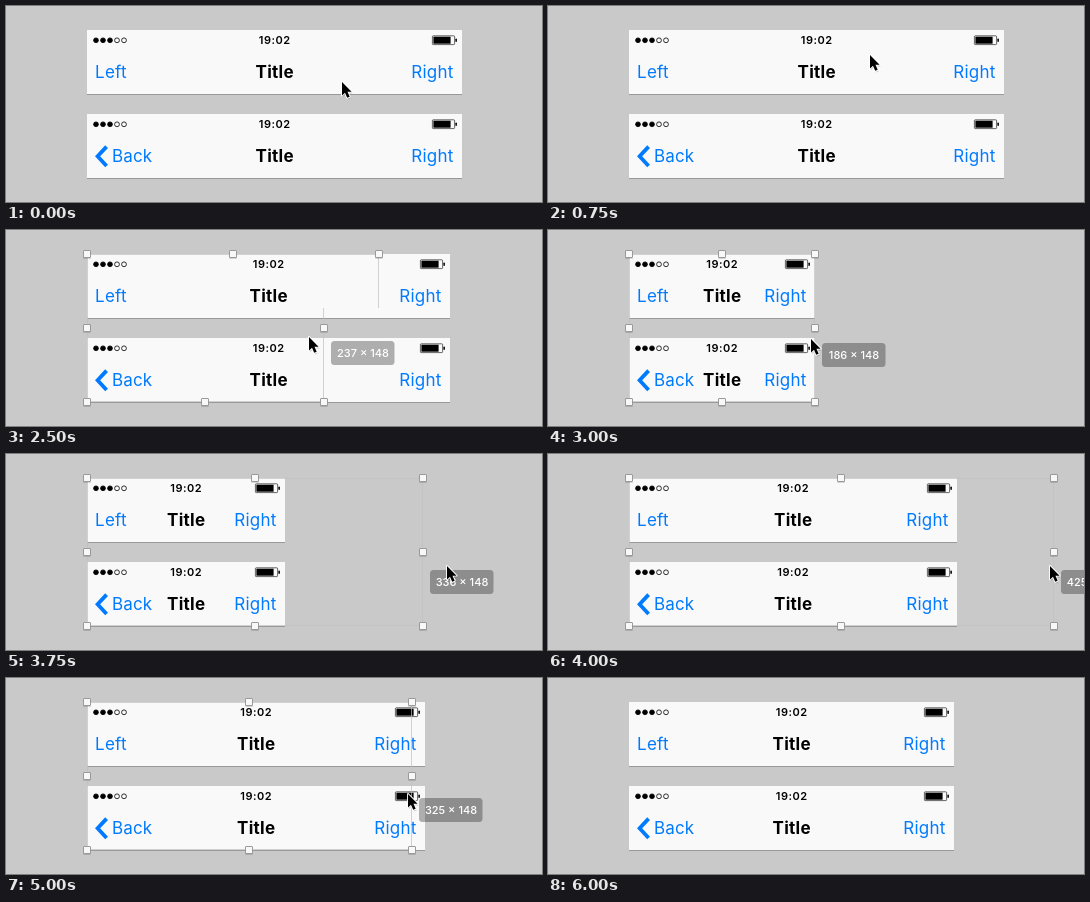
Recreate the animation shown at these times as an HTML page. Size 536x196 px, loop 7000 ms.

```html
<!DOCTYPE html>
<html lang="en">
<head>
<meta charset="utf-8">
<title>Resizing navigation bars</title>
<style>
  html, body { margin: 0; width: 100%; height: 100%; overflow: hidden; background: #c9c9c9; }
  svg { display: block; font-family: Inter, "Liberation Sans", sans-serif; }
  .clock { font-size: 11px; font-weight: 600; letter-spacing: .5px; text-anchor: middle; }
  .title { font-size: 17px; font-weight: 700; letter-spacing: .25px; text-anchor: middle; }
  .link { font-size: 17px; fill: #007aff; letter-spacing: .2px; }
  .end { text-anchor: end; }
  .size { font-size: 11px; font-weight: 500; fill: #fff; text-anchor: middle; }
  .edge { fill: none; stroke: #c0c0c0; stroke-opacity: .7; }
</style>
</head>
<body>
<svg width="536" height="196" viewBox="0 0 536 196">
  <defs>
    <g id="battery">
      <rect x="-29.6" y="5.8" width="22.2" height="8.8" rx=".8" fill="none" stroke="#000" stroke-width=".8" stroke-opacity=".75"/>
      <rect x="-28.6" y="6.7" width="17.2" height="7"/>
      <rect x="-6.6" y="8.6" width="1.5" height="3.4" rx=".7"/>
    </g>
    <g id="handle">
      <rect x="-4" y="-3" width="8" height="8" rx="1" fill-opacity=".14"/>
      <rect x="-3.5" y="-3.5" width="7" height="7" rx=".5" fill="#f8f8f8" stroke="#999"/>
    </g>
  </defs>
  <g id="bars"></g>
  <g id="selection">
    <path class="edge" id="outline"/>
    <g id="handles"></g>
  </g>
  <g id="label">
    <rect width="63.5" height="24" rx="3.5" fill-opacity=".3"/>
    <text class="size" x="32" y="16"></text>
  </g>
  <g id="cursor">
    <path d="M1 1.5V15l3-2.6 2.2 5 2.6-1.1-2.2-4.8h4.2z" fill-opacity=".18"/>
    <path d="M0 0V13.4L3 10.7 5.2 15.8 7.7 14.8 5.5 9.7H9.6Z" stroke="#fff" stroke-width="1.8" paint-order="stroke" stroke-linejoin="round"/>
  </g>
</svg>
<script>
  const LOOP = 7000, TICK = 250;
  const LEFT = 81, TOP = 24, MID = 98, BOTTOM = 172, TEAR = 78, FULL = 375;
  const $ = id => document.getElementById(id);

  // Each move is [start, end, ...values reached].
  const pull = [3500, 3926, 425], settle = [4500, 4879, 325];
  const lowerBox = [[2250, 2629, 186], pull, settle];
  const upperBox = [[2000, 2250, 324], [2388, 2748, 186], pull, settle];
  const barMoves = [[2437, 2854, 186], [3673, 4253, 425], [4500, 5149, 325]];
  const pointer = [
    [0, 250, 291, 94], [250, 500, 311, 153], [500, 750, 322, 49],
    [1000, 1500, 432, 103], [1500, 1750, 455, 107], [1750, 2000, 450, 101],
    [2014, 2708, 263, 109], [3500, 3873, 502, 112.4], [4500, 4879, 402, 116]
  ];

  const ease = u => u * u * (3 - 2 * u);

  function follow(moves, from, t) {
    let at = from;
    for (const [start, end, ...to] of moves) {
      const k = ease(Math.min(1, Math.max(0, (t - start) / (end - start))));
      at = at.map((v, i) => v + (to[i] - v) * k);
    }
    return at.map(Math.round);
  }

  const place = (el, x, y) => el.setAttribute("transform", `translate(${x} ${y})`);
  const show = (el, on) => { el.style.display = on ? "" : "none"; };

  function dots() {
    return [0, 1, 2, 3, 4].map(i =>
      `<circle cx="${9 + 7 * i}" cy="10.3" r="2.4" stroke="#000" stroke-width=".8" fill-opacity="${i < 3 ? 1 : 0}"/>`).join("");
  }

  function makeBar(y, back) {
    const g = document.createElementNS("http://www.w3.org/2000/svg", "g");
    place(g, LEFT, y);
    const left = back
      ? `<path d="M19.6 32.6 10.6 42.3 19.6 52" fill="none" stroke="#007aff" stroke-width="3.8"/>
         <text class="link" x="24.9" y="48">Back</text>`
      : `<text class="link" x="8.1" y="48">Left</text>`;
    g.innerHTML = `<rect class="wide" height="64" fill="#f9f9f9"/>
      <rect class="wide" y="64" height="1" fill="#999"/>
      ${dots()}${left}
      <text class="clock mid" y="14">19:02</text>
      <text class="title mid" y="48">Title</text>
      <use class="right" href="#battery"/>
      <g class="right"><text class="link end" x="-8.6" y="48">Right</text></g>`;
    $("bars").append(g);
  }

  function setWidth(w) {
    const each = (sel, fn) => $("bars").querySelectorAll(sel).forEach(fn);
    each(".wide", el => el.setAttribute("width", w));
    each(".mid", el => el.setAttribute("x", w / 2 + .2));
    each(".right", el => place(el, w, 0));
  }

  function setSelection(low, high) {
    const right = LEFT + low, upper = LEFT + high;
    const half = w => LEFT + Math.floor(w / 2);
    const points = [
      [LEFT, TOP], [half(high), TOP], [upper, TOP],
      [LEFT, MID], [right, MID],
      [LEFT, BOTTOM], [half(low), BOTTOM], [right, BOTTOM]
    ];
    $("handles").innerHTML = points.map(([x, y]) =>
      `<use href="#handle" x="${x}" y="${y}"/>`).join("");
    $("outline").setAttribute("d",
      `M${LEFT + .5} ${TOP + .5}H${upper - .5}V${TEAR}M${right - .5} ${TEAR}V${BOTTOM - .5}H${LEFT + .5}V${TOP + .5}`);
  }

  function draw(t) {
    const [low] = follow(lowerBox, [FULL], t);
    const [high] = follow(upperBox, [FULL], t);
    const [x, y] = follow(pointer, [336, 76], t);
    const size = Math.min(low, high);

    setWidth(follow(barMoves, [FULL], t)[0]);
    setSelection(low, high);
    place($("cursor"), x, y);
    place($("label"), LEFT + size + 7, y + 4);
    $("label").querySelector("text").textContent = `${size} × ${BOTTOM - TOP}`;

    show($("selection"), t >= 1000 && t < 6000);
    show($("label"), t >= 2250 && t < 5500);
    show($("cursor"), t < 5750);
  }

  makeBar(TOP, false);
  makeBar(108, true);

  const begin = performance.now();
  let shown = -1;
  function tick() {
    const t = Math.max(0, performance.now() - begin) % LOOP;
    const beat = Math.floor(t / TICK) * TICK;
    if (beat !== shown) draw(shown = beat);
    requestAnimationFrame(tick);
  }
  tick();
</script>
</body>
</html>
```
